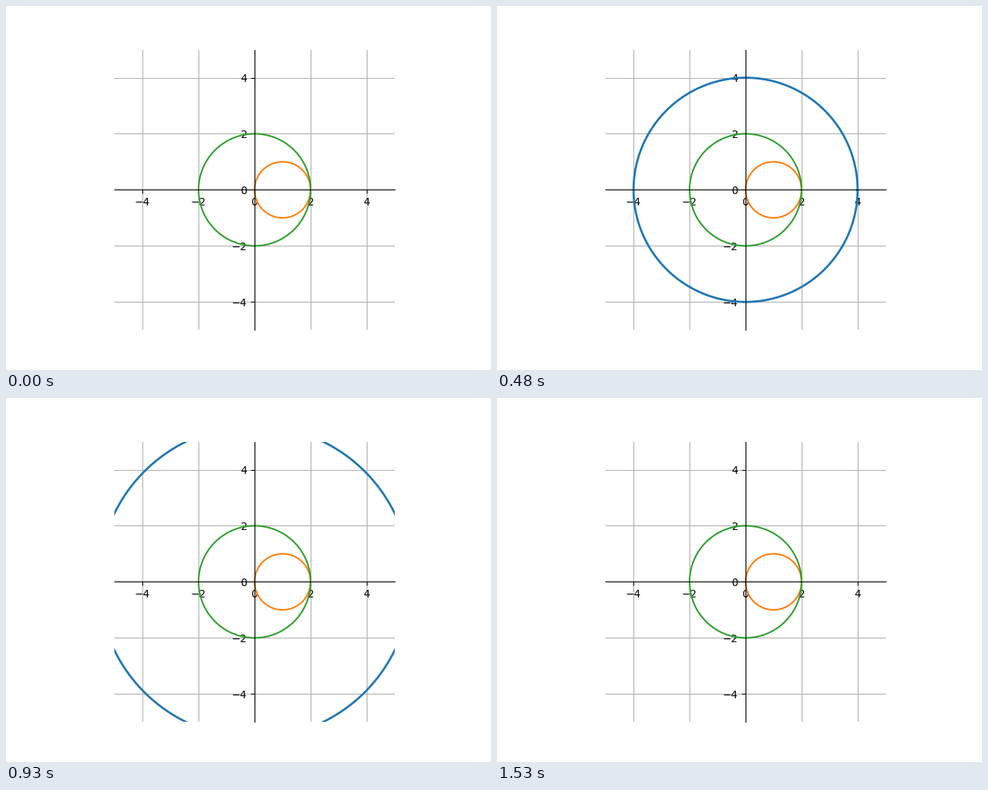
Recreate the animation shown at these times as a matplotlib script. Size 640 by 480 pixels, loop 6.44 s.

```python
import numpy as np
import matplotlib.pyplot as plt
from matplotlib.animation import FuncAnimation

LOOP_MS = 6440
TICK_MS = 20
STEP_MS = 30
LAST_STEP = 50  # the growing circle leaves the corners after this step

theta = np.linspace(0, 2 * np.pi, 361)


def circle(radius, center_x=0):
    return center_x + radius * np.cos(theta), radius * np.sin(theta)


fig, ax = plt.subplots(figsize=(6.4, 4.8), dpi=100)
ax.set_aspect("equal")
ax.set(xlim=(-5, 5), ylim=(-5, 5),
       xticks=range(-4, 5, 2), yticks=range(-4, 5, 2))
ax.grid(True)
for side in ("left", "bottom"):
    ax.spines[side].set_position("center")
for side in ("right", "top"):
    ax.spines[side].set_visible(False)

growing, = ax.plot([], [], color="C0", lw=2)
ax.plot(*circle(1, center_x=1), color="C1", lw=1.5)
ax.plot(*circle(2), color="C2", lw=1.5)


def update(frame):
    # Half a tick of lead keeps the 30 ms steps aligned with the 20 ms ticks.
    step = (frame * TICK_MS + TICK_MS // 2) // STEP_MS
    growing.set_visible(0 < step <= LAST_STEP)
    growing.set_data(*circle(np.sqrt(step)))
    return growing,


anim = FuncAnimation(fig, update, frames=LOOP_MS // TICK_MS,
                     interval=TICK_MS, repeat=True, repeat_delay=0)
plt.show()
```
